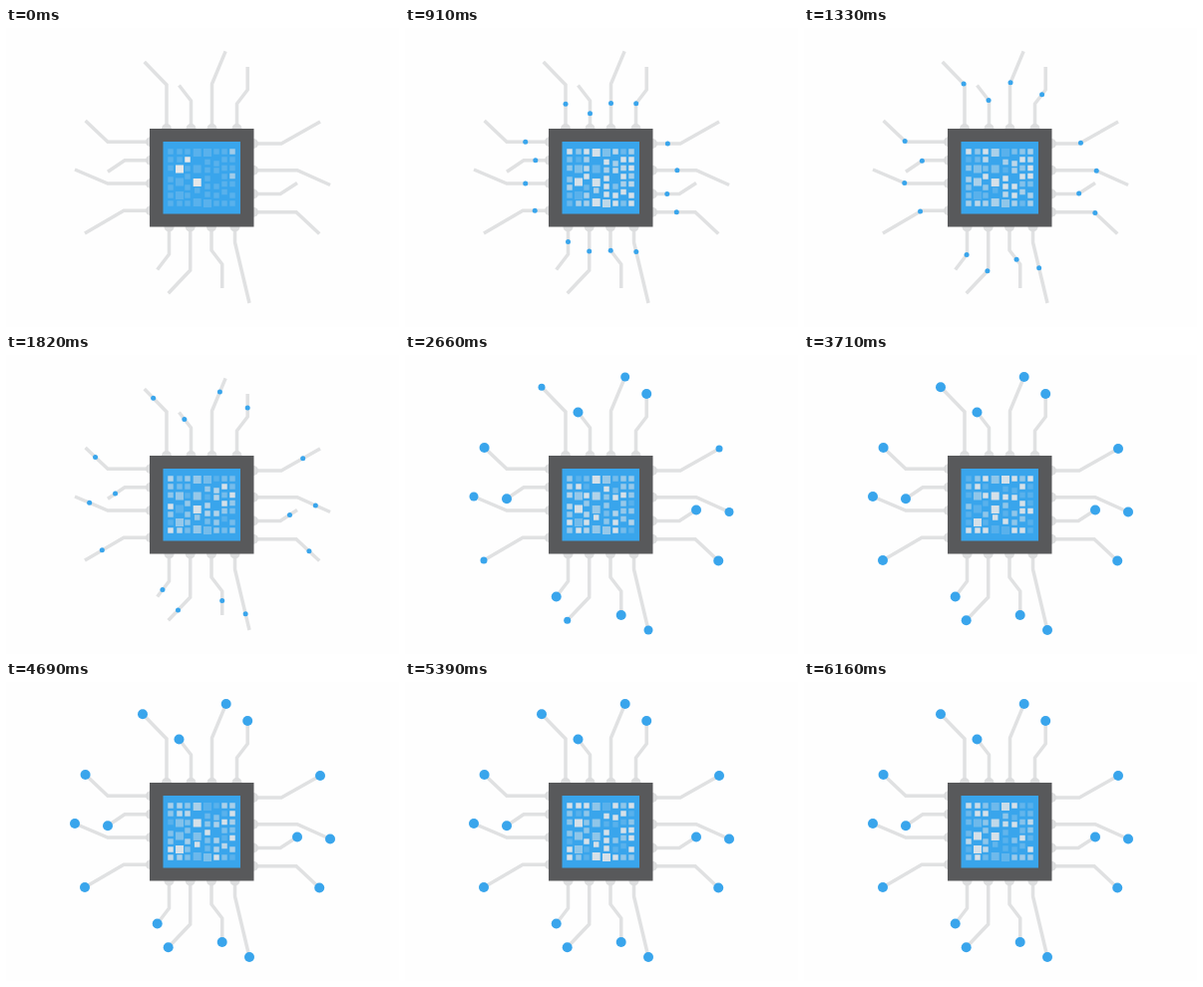
These frames come from a looping animation (394 by 300 pixels, 6230 ms). An HTML page:

```html
<!DOCTYPE html>
<html lang="en">
<head>
<meta charset="utf-8">
<title>Chip</title>
<style>
  html, body { margin: 0; width: 100%; height: 100%; overflow: hidden; background: #fefefe; }
  svg { display: block; width: 100vw; height: 100vh; }
</style>
</head>
<body>
<svg viewBox="0 0 394 300">
  <g id="wires" fill="none" stroke="#e0e1e2" stroke-width="3.5"></g>
  <g id="pads" fill="#dcddde"></g>
  <g id="dots" fill="#39a5ec"></g>
  <rect x="144" y="101" width="104.5" height="98.5" fill="#58595b"/>
  <rect x="157.5" y="114" width="77.5" height="72.5" fill="#39a5ec"/>
  <g id="cells" fill="#e6e7e8"></g>
</svg>
<script>
const LOOP = 6230, STEP = 70, HOLD = 350, TRAVEL = 1890, GROW = 350;
const SMALL_R = 2.5, BIG_R = 5;

// Each wire runs from the chip edge to its tip; wave orders the swelling of the dots.
// stops: share of the travel time at each corner; trim: gap left before the tip.
const wires = [
  { points: [[161, 101], [161, 57], [137, 32.3]], wave: 2, trim: 2.5 },
  { points: [[185.5, 101], [185.5, 73], [173.5, 57.5]], wave: 0 },
  { points: [[206.5, 101], [206.5, 56], [220.7, 22]], wave: 1, trim: 1.5 },
  { points: [[231.5, 101], [231.5, 76], [242.2, 62], [242.2, 39]], wave: 0, stops: [0, .29, .635, 1] },
  { points: [[248, 116], [276, 116], [315, 94]], wave: 2 },
  { points: [[248, 142.7], [292, 142.7], [325, 157.5]], wave: 1 },
  { points: [[248, 166.5], [275, 166.5], [292, 155.5]], wave: 0 },
  { points: [[248, 184.7], [291, 184.7], [314.2, 206.5]], wave: 0 },
  { points: [[229.5, 199.5], [229.5, 215], [244, 276]], wave: 1, stops: [0, .165, 1] },
  { points: [[206, 199.5], [206, 223], [216.7, 237], [216.7, 261]], wave: 0, stops: [0, .29, .635, 1] },
  { points: [[184.7, 199.5], [184.7, 243], [162.7, 266.3]], wave: 2 },
  { points: [[163.5, 199.5], [163.5, 227], [151.7, 242.5]], wave: 0 },
  { points: [[145, 183.2], [118, 183.2], [79, 206]], wave: 2 },
  { points: [[145, 156], [102, 156], [69, 142]], wave: 1 },
  { points: [[145, 132.7], [119, 132.7], [102, 144.2]], wave: 0 },
  { points: [[145, 114.2], [102, 114.2], [79.6, 93]], wave: 0 },
];

// Columns of small and large squares on the die.
const columns = [
  { x: 165, small: [124, 132, 140.5, 152, 160, 168, 176] },
  { x: 174, small: [124, 132, 176], large: [141.5, 154.5, 168] },
  { x: 182, small: [124, 132, 141, 149, 160, 168, 176] },
  { x: 191.7, small: [163], large: [125, 141.5, 155, 175] },
  { x: 202, small: [134.5, 142.5, 151, 159, 167], large: [125, 176] },
  { x: 211, small: [124, 136, 143, 159, 168, 176] },
  { x: 219, small: [124, 132, 140.5, 149, 156.5, 164.5, 176] },
  { x: 227, small: [124, 132, 140.5, 148.5, 156.5, 168, 176] },
];

// Cells lit at rest, and the share of bright cells over the loop.
const restLevels = { "182,132": 1, "174,141.5": 1, "191.7,155": 1, "227,124": .6, "227,148.5": .6 };
const brightShare = [0, .6, .5, .4, .4, .45, .5, .5, .4, .3, .4, .45, .5, .5, .5];
const KEY = 420;

const clamp = v => Math.min(1, Math.max(0, v));
const mix = (a, b, k) => a + (b - a) * k;

function add(parent, tag, attributes) {
  const node = document.createElementNS("http://www.w3.org/2000/svg", tag);
  for (const name in attributes) node.setAttribute(name, attributes[name]);
  return document.getElementById(parent).appendChild(node);
}

function shift([x, y], [toX, toY], distance) {
  const k = distance / Math.hypot(toX - x, toY - y);
  return [mix(x, toX, k), mix(y, toY, k)];
}

for (const wire of wires) {
  const { points, trim = 0 } = wire;
  const last = points.length - 1;
  const line = [...points.slice(0, last), shift(points[last], points[last - 1], trim)];
  add("wires", "polyline", { points: line.join(" ") });
  add("pads", "circle", { cx: points[0][0], cy: points[0][1], r: 5 });
  wire.path = [shift(points[0], points[1], -3), ...points.slice(1)];
  wire.stops ||= [0, .5, 1];
  wire.dot = add("dots", "circle", { r: SMALL_R });
}

const cells = [];
for (const { x, small, large = [] } of columns) {
  const place = size => y => cells.push({
    rest: restLevels[`${x},${y}`] || .18,
    node: add("cells", "rect", { x: x - size / 2, y: y - size / 2, width: size, height: size }),
  });
  small.forEach(place(5.5));
  large.forEach(place(8));
}

function random(a, b) {
  const v = Math.sin(a * 127.1 + b * 311.7) * 43758.5453;
  return v - Math.floor(v);
}

function cellLevel(cell, index, key) {
  if (key === 0) return cell.rest;
  const value = random(index + 1, key);
  const share = brightShare[key];
  return value < share ? .9 : value < share + .25 ? .5 : .18;
}

function positionOn({ path, stops }, progress) {
  let i = 0;
  while (i < stops.length - 2 && progress > stops[i + 1]) i++;
  const k = (progress - stops[i]) / (stops[i + 1] - stops[i]);
  return [mix(path[i][0], path[i + 1][0], k), mix(path[i][1], path[i + 1][1], k)];
}

function draw(now) {
  const time = Math.floor(now % LOOP / STEP) * STEP;
  const elapsed = Math.max(0, time - HOLD);

  for (const wire of wires) {
    const [x, y] = positionOn(wire, clamp(elapsed / TRAVEL));
    const growth = clamp((elapsed - TRAVEL - wire.wave * 140) / GROW);
    wire.dot.setAttribute("cx", x);
    wire.dot.setAttribute("cy", y);
    wire.dot.setAttribute("r", time < HOLD ? 0 : mix(SMALL_R, BIG_R, growth));
  }

  const key = Math.floor(elapsed / KEY);
  const blend = elapsed / KEY - key;
  cells.forEach((cell, i) => {
    const level = mix(cellLevel(cell, i, key), cellLevel(cell, i, key + 1), blend);
    cell.node.setAttribute("opacity", level);
  });
}

let start;
function tick(now) {
  start ??= now;
  draw(now - start);
  requestAnimationFrame(tick);
}
draw(0);
requestAnimationFrame(tick);
</script>
</body>
</html>
```
